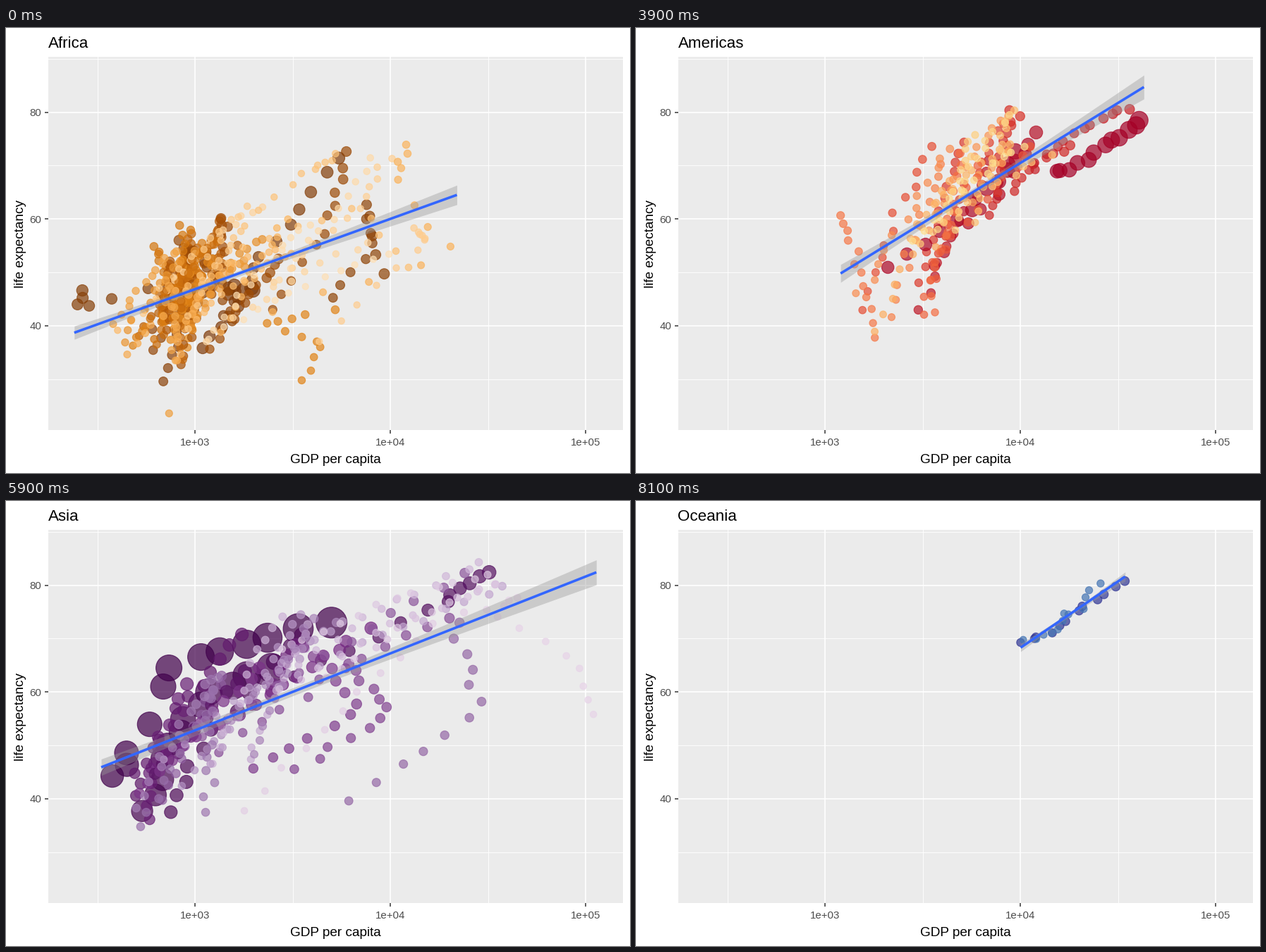
Animation, 885 px wide and 632 px high, one loop 10000 ms. Source, as a matplotlib script:

```python
import numpy as np
import matplotlib.pyplot as plt
from matplotlib.animation import FuncAnimation
from matplotlib.colors import LinearSegmentedColormap

W, H, DPI = 885, 632, 100
PX = 72 / DPI  # points per pixel
HOLD = 20      # frames per continent
plt.rcParams["font.family"] = "Liberation Sans"
rng = np.random.default_rng(11)

# Rows: countries alike, population (millions), GDP per capita, life expectancy
africa = [
    (1, 135, [1077, 1700, 1500, 2014], [36, 43, 47.5, 46.9]),
    (1, 80, [1419, 2300, 5581], [42, 54, 71.3]),
    (1, 65, [800, 900, 670, 250, 278], [39, 44, 48, 43, 46.5]),
    (1, 44, [4725, 8000, 7500, 9270], [45, 54, 63, 49.3]),
    (1, 33, [2449, 4900, 6223], [43, 59, 72.3]),
    (1, 5, [2388, 21500, 10500, 12057], [43, 53, 68.5, 74]),
    (1, 1.4, [4293, 15500, 13206], [37, 56, 58]),
    (1, 10, [3521, 4800, 2300, 4797], [30, 37, 40.5, 42.7]),
    (1, 1.6, [851, 2200, 7000, 12570], [47, 56, 62, 50.7]),
    (3, 1.5, [2000, 3800, 8500], [50, 64, 74]),
    (1, 7, [737], [23.6]),
    (10, 33, [780, 1150], [39, 54]),
    (20, 11, [720, 1050], [38.5, 53]),
    (9, 1.4, [1050, 2800], [41, 58]),
]
americas = [
    (1, 301, [13990, 21000, 30500, 42952], [68.4, 70.6, 75.4, 78.2]),
    (1, 190, [2109, 4400, 7300, 9066], [51, 59, 66, 72.4]),
    (1, 109, [3478, 7800, 11978], [51, 66, 76.2]),
    (1, 33, [11367, 36319], [69, 80.7]),
    (2, 33, [7500, 12000], [60, 74.5]),
    (2, 36, [2900, 7200], [47, 72]),
    (1, 8, [1840, 1202], [37.6, 61]),
    (6, 9, [2250, 4800], [43, 71]),
    (8, 4, [3500, 9500], [57, 76.5]),
    (2, 13, [3700, 10500], [53, 77]),
]
asia = [
    (1, 1319, [400, 511, 700, 1210, 2150, 4959], [44, 49, 63.5, 67, 70, 73]),
    (1, 1110, [547, 725, 1000, 2452], [37.4, 49, 58.5, 64.7]),
    (1, 224, [750, 1000, 2000, 3541], [37.5, 48, 61, 70.7]),
    (1, 127, [3217, 18000, 31656], [63, 76.3, 82.6]),
    (4, 110, [580, 740, 1800], [40, 53, 66]),
    (2, 80, [1000, 2000, 4500], [49, 61, 71]),
    (1, 2.5, [110000, 92000, 31000, 45000], [56, 66, 75, 77.6]),
    (2, 50, [3500, 11000, 6500], [45, 57, 67]),
    (1, 27, [6460, 30000, 21655], [40, 57, 73]),
    (5, 6, [2800, 32000], [61, 80]),
    (2, 40, [1100, 25000], [51, 78.5]),
    (7, 13, [1500, 4500], [47, 72]),
    (4, 24, [640, 1300], [37, 63]),
    (1, 3, [1828, 22316], [37.6, 75.6]),
]
europe = [
    (1, 71, [1969, 3700, 8458], [43.6, 60.3, 71.8]),
    (4, 64, [7200, 17500, 31000], [67.5, 73.3, 80.2]),
    (10, 8.5, [8200, 18500, 36000], [69.5, 73.8, 79.8]),
    (8, 13, [4600, 12000, 18000], [63.5, 71, 75.5]),
    (4, 4, [2000, 6000, 9000], [57, 70.5, 75.2]),
    (3, 20, [3500, 13500, 26000], [64, 73, 79.5]),
]
oceania = [
    (1, 20.4, [10040, 15800, 22000, 34435], [69.1, 71.5, 76.6, 81.2]),
    (1, 4.1, [10557, 15900, 18700, 25185], [69.4, 71.8, 75, 80.2]),
]


def trail(pop, gdp, life):
    """Twelve surveys of one country: log GDP, life expectancy, radius in px."""
    k = len(gdp)
    n = 12 if k > 1 else 1
    t, knots = np.linspace(0, 1, n), np.linspace(0, 1, k)
    x = np.interp(t, knots, np.log10(gdp))
    y = np.interp(t, knots, life)
    if k > 1:
        x += rng.normal(0, 0.015, n)
        y += rng.normal(0, 0.25, n)
    if k == 2:
        y += 6 * t * (1 - t)
    pops = pop * 0.45 ** (1 - t)
    return x, y, 4.14 + 17.8 * np.sqrt(pops / 1319)


def expand(rows, sx, sy):
    """Turn each row into its countries, scattered by sx and sy if several."""
    out = []
    for n, pop, gdp, life in rows:
        for _ in range(n):
            m = int(n > 1)
            dx = m * rng.normal(0, sx, len(gdp))
            dy = m * (rng.normal(0, sy) + rng.normal(0, sy / 2, len(life)))
            size = rng.uniform(0.5, 1.4) if m else 1
            out.append((pop * size, np.array(gdp) * 10 ** dx, np.array(life) + dy))
    return sorted(out, key=lambda c: -c[0])


fig = plt.figure(figsize=(W / DPI, H / DPI), dpi=DPI, facecolor="white")
ax = fig.add_axes([60 / W, 61 / H, 815 / W, 530 / H], facecolor="#EBEBEB")
ax.set_xlim(3 - 208 / 277, 3 + 607 / 277)
ax.set_ylim(80 - 451.5 / 7.585, 80 + 78.5 / 7.585)
ax.spines[:].set_visible(False)
ax.set_xticks([3, 4, 5], [])
ax.set_yticks([40, 60, 80], [])
ax.tick_params(length=5 * PX, width=1.5 * PX, color="#333333")


def grid(xs, ys, px):
    for x in xs:
        ax.axvline(x, color="white", lw=px * PX, zorder=0.5)
    for y in ys:
        ax.axhline(y, color="white", lw=px * PX, zorder=0.5)


def label(x, y, s, px, color="black", **kw):
    return fig.text(x / W, 1 - y / H, s, fontsize=px * PX, color=color, va="baseline", **kw)


def build(rows, jitter, ramp, trend):
    """Dots, confidence band and trend line of one continent."""
    x0, y0, x1, y1 = trend
    rows = expand(rows, *jitter)
    n = len(rows)
    shades = LinearSegmentedColormap.from_list("ramp", ramp.split())(np.linspace(0, 1, n))
    order = np.argsort(np.arange(n) + rng.uniform(0, 0.7, n) * (n - 2))
    trails = [trail(*rows[i]) for i in order]
    x, y, r = (np.concatenate(part) for part in zip(*trails))
    x = np.clip(x, x0, x1)
    colors = np.repeat(shades[order], [len(t[0]) for t in trails], axis=0)
    colors[:, 3] = 0.7
    dots = ax.scatter(x, y, s=(2 * r * PX) ** 2, c=colors, edgecolors=colors,
                      linewidths=1.2 * PX, zorder=1)

    lx = np.linspace(x0, x1, 80)
    ly = np.interp(lx, [x0, x1], [y0, y1])
    error = np.std(y - np.polyval(np.polyfit(x, y, 1), x))
    half = 1.97 * error * np.sqrt((1 + ((lx - x.mean()) / x.std()) ** 2) / len(x))
    area = ax.fill_between(lx, ly - half, ly + half, color="#999999", alpha=0.4, lw=0, zorder=2)
    line, = ax.plot(lx, ly, color="#3366FF", lw=3.6 * PX, solid_capstyle="butt", zorder=3)
    return dots, area, line


grid([2.5, 3.5, 4.5], [30, 50, 70, 90], 0.9)
grid([3, 4, 5], [40, 60, 80], 1.6)
for i, s in enumerate(["1e+03", "1e+04", "1e+05"]):
    label(268 + 277 * i, 593, s, 15, "#4D4D4D", ha="center")
for i, s in enumerate(["80", "60", "40"]):
    label(50.5, 125 + 151.7 * i, s, 15, "#4D4D4D", ha="right")
label(467, 618, "GDP per capita", 19, ha="center")
label(25, 306.5, "life expectancy", 19, rotation=90, rotation_mode="anchor", ha="center")
title = label(59.5, 28, "", 22.4)

names = ["Africa", "Americas", "Asia", "Europe", "Oceania"]
layers = [
    build(africa, (0.15, 3.2), "#7F3B08 #B35806 #E08214 #FDB863 #FEE0B6",
          (2.382, 38.7, 4.341, 64.5)),
    build(americas, (0.11, 2.2), "#A50026 #D73027 #F46D43 #FDAE61 #FEE090",
          (3.08, 49.8, 4.633, 84.7)),
    build(asia, (0.13, 2.5), "#40004B #762A83 #9970AB #C2A5CF #E7D4E8",
          (2.52, 45.9, 5.055, 82.4)),
    build(europe, (0.07, 1.1), "#276419 #4D9221 #7FBC41 #B8E186 #E6F5D0",
          (2.988, 56.5, 4.693, 81.1)),
    build(oceania, (0, 0), "#313695 #4575B4", (4.0017, 68.3, 4.537, 81.6)),
]


def update(i):
    # The heading follows the data one frame late
    title.set_text(names[max(i - 1, 0) // HOLD])
    for k, layer in enumerate(layers):
        for artist in layer:
            artist.set_visible(k == i // HOLD)


anim = FuncAnimation(fig, update, frames=HOLD * len(names), init_func=lambda: update(0),
                     interval=100, repeat=True, repeat_delay=0)
plt.show()
```
